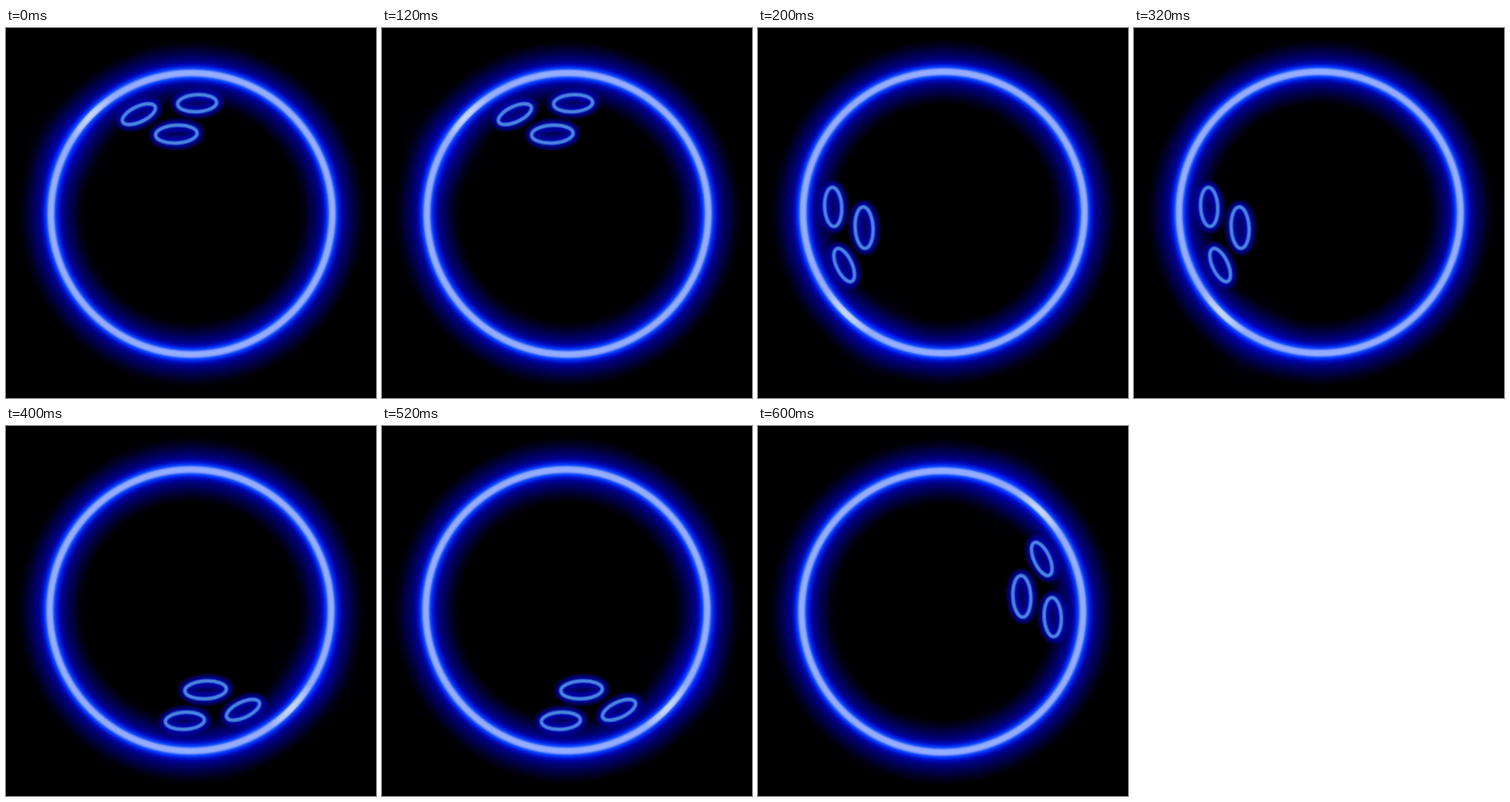
These frames come from a looping animation (455x455 px, 0.8 s). An HTML page with a canvas:

```html
<!DOCTYPE html>
<html lang="en">
<head>
<meta charset="utf-8">
<title>Neon bowling ball</title>
<style>
html, body { margin: 0; width: 100%; height: 100%; overflow: hidden; background: #000; }
canvas { display: block; }
</style>
</head>
<body>
<canvas id="stage" width="455" height="455"></canvas>
<script>
const ctx = document.getElementById('stage').getContext('2d');
const MID = 227.5, RADIUS = 173, REACH = 42;
const STEP_MS = 200;
const rad = deg => deg * Math.PI / 180;

// Ring colour by distance from the centre line of the tube
const GLOW = [
  [0, '#98aeff'], [2.3, '#90a8ff'], [3.7, '#6a8cff'], [4.9, '#2a5cff'],
  [6.2, '#0640fa'], [8, '#0024e4'], [10, '#000ec0'], [13, '#000296'],
  [16, '#00007c'], [20, '#000064'], [25, '#000048'], [30, '#00002c'],
  [35, '#000014'], [39, '#000006'], [REACH, '#000000']
];

// x, y, half length, half width, tilt in degrees
const HOLES = [
  [-64, -121.5, 22, 9.5, -25],
  [7.5, -135, 24, 10.5, -3],
  [-18, -97, 25.5, 11, -3]
];

function ring(x, y) {
  const inner = RADIUS - REACH, outer = RADIUS + REACH;
  const fill = ctx.createRadialGradient(x, y, inner, x, y, outer);
  for (const [d, color] of GLOW) {
    fill.addColorStop(0.5 - d / REACH / 2, color);
    fill.addColorStop(0.5 + d / REACH / 2, color);
  }
  ctx.fillStyle = fill;
  ctx.beginPath();
  ctx.arc(x, y, outer, 0, 2 * Math.PI);
  ctx.arc(x, y, inner, 0, 2 * Math.PI, true);
  ctx.fill();
}

// Round spot of light on the tube that fades to nothing
function spot(x, y, angle, radius, rgb, alpha) {
  const px = x + RADIUS * Math.cos(angle), py = y + RADIUS * Math.sin(angle);
  const light = ctx.createRadialGradient(px, py, 0, px, py, radius);
  light.addColorStop(0, `rgba(${rgb},${alpha})`);
  light.addColorStop(0.45, `rgba(${rgb},${alpha * 0.6})`);
  light.addColorStop(1, `rgba(${rgb},0)`);
  return light;
}

function shine(x, y) {
  ctx.globalCompositeOperation = 'lighter';
  ctx.fillStyle = spot(x, y, rad(208), 60, '0,0,255', 0.12);
  ctx.fillRect(-MID, -MID, 2 * MID, 2 * MID);
  ctx.globalCompositeOperation = 'source-over';

  const angle = rad(224);
  ctx.strokeStyle = spot(x, y, angle, 36, '215,230,255', 0.5);
  for (const width of [8, 5]) {
    ctx.lineWidth = width;
    ctx.beginPath();
    ctx.arc(x, y, RADIUS, angle - 0.22, angle + 0.22);
    ctx.stroke();
  }
}

function hole([x, y, rx, ry, tilt]) {
  const stroke = (color, ...widths) => {
    ctx.strokeStyle = color;
    for (const width of widths) {
      ctx.lineWidth = width;
      ctx.stroke();
    }
  };
  ctx.beginPath();
  ctx.ellipse(x, y, rx, ry, rad(tilt), 0, 2 * Math.PI);
  ctx.fillStyle = 'rgba(0,0,105,.85)';
  ctx.fill();
  stroke('rgba(0,0,190,.16)', 19, 17, 15, 13, 11, 9, 7);
  stroke('rgba(30,80,215,.45)', 6.4, 5.2);
  stroke('rgba(80,140,222,.55)', 4, 3, 2);
}

function draw(now) {
  const turn = Math.floor(now / STEP_MS) % 4;
  ctx.setTransform(1, 0, 0, 1, 0, 0);
  ctx.fillStyle = '#000';
  ctx.fillRect(0, 0, 455, 455);
  ctx.translate(MID, MID);
  ctx.rotate(-turn * Math.PI / 2);
  ring(0.7, 0.9);
  shine(0.7, 0.9);
  HOLES.forEach(hole);
}

const start = performance.now();
function tick() {
  draw(performance.now() - start);
  requestAnimationFrame(tick);
}
tick();
</script>
</body>
</html>
```
